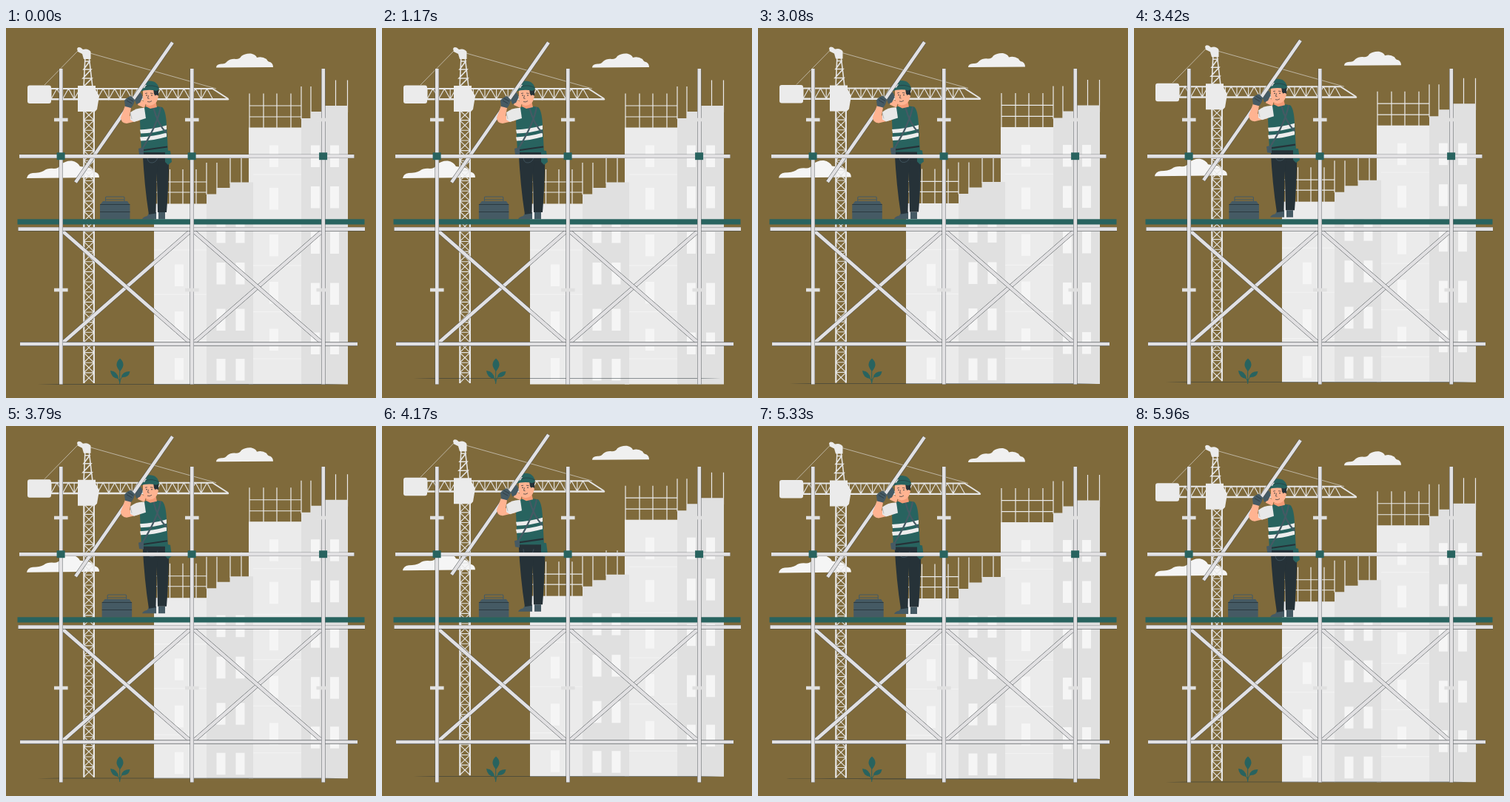
These frames come from a looping animation (500 by 500 pixels, 6000 ms). An HTML page:

```html
<!DOCTYPE html>
<html lang="en">
<head>
<meta charset="utf-8">
<title>Scaffolding</title>
<style>
  html, body { margin: 0; width: 100%; height: 100%; overflow: hidden; background: #7f6a3b; }
  svg { display: block; width: 100vw; height: 100vh; }
</style>
</head>
<body>
<svg id="stage" viewBox="0 0 500 500"></svg>
<script>
const TEAL = '#28635f', DARK = '#263238', SLATE = '#455a64', SKIN = '#ffb391';
const PALE = '#ebebeb', SIDE = '#e0e0e0', WHITE = '#f5f5f5', STEEL = '#e2e1e3';

const rect = (x, y, x2, y2, fill, r = 0) =>
  `<rect x="${x}" y="${y}" width="${x2 - x}" height="${y2 - y}" rx="${r}" fill="${fill}"/>`;
const shape = (d, fill) => `<path d="${d}" fill="${fill}"/>`;
const line = (d, stroke, w = 1, extra = '') =>
  `<path d="${d}" fill="none" stroke="${stroke}" stroke-width="${w}" ${extra}/>`;
const each = (list, f) => list.map(f).join('');
const range = (n, f) => Array.from({ length: n }, (_, i) => f(i)).join('');

// Steel tube: a light bar with thin dark edges
const tube = (x, y, x2, y2, w = 5) => {
  const d = `M${x} ${y}L${x2} ${y2}`;
  return line(d, '#3a4144', w + .4) + line(d, STEEL, w - .3);
};

function clouds() {
  return shape('M284 53.5Q284 49 291 48.5Q296 49 299 45Q304 41 311 42Q316 42 318 38Q323 34 331 34.5Q338 36 339 40Q346 38 352 42Q354 46 357 46Q361 48 361 53Z', '#f0f0f0')
    + shape('M28 203Q29 197 36 196Q46 196 51 193Q56 189 65 190Q71 190 74 185Q80 179 89 179.5Q97 181 100 187Q106 188 110 188Q116 189 118 194Q126 195 126 202Z', WHITE);
}

function crane() {
  const c = '#e6e6e6';
  const mast = range(27, i => {
    const y = 111 + i * 13.65, b = y + 13.65;
    return `M105 ${y}H119M105 ${y}L119 ${b}M119 ${y}L105 ${b}`;
  });
  const jib = range(14, i => {
    const x = 61 + i * 15.6;
    return `M${x} 82V96L${x + 7.8} 82L${x + 15.6} 96`;
  });
  return line('M99 29L52 77M110 33L284 82', c, .6)
    + line(mast, c, 1.1) + line('M105.3 100V480M118.9 100V480', c, 2.2)
    + line('M105 80L107 38M117 80L112 38M106 45H113L105 56H115L104 68H116L105 79', c, 1.6)
    + shape('M96 28Q97 25 101 26.5L104 29Q111 27 114.5 32V42H105L103 35L97 32Z', PALE)
    + line(jib, c, 1.1) + line('M60 82H279L300 95.5', c, 1.9)
    + line('M60 96.3H300', c, 2.4, 'stroke-linecap="round"')
    + rect(29, 77.5, 61, 102, PALE, 3)
    + shape('M97 78H121V83L126 92L123 110L120 113H97Z', PALE);
}

function buildings() {
  const bars = (xs, top, bottom) => each(xs, x => `M${x} ${top}V${bottom}`);
  const windows = (xs, ys) => each(ys, y => each(xs, x => rect(x, y, x + 12, y + 29.5, WHITE)));
  const floors = (x, x2, ys) => line(each(ys, y => `M${x} ${y}H${x2}`), WHITE, .8);
  const rebar = bars([205, 221.5, 239, 257], 191, 238) + bars([271, 285], 182, 225)
    + bars([303, 318], 176, 210) + bars([329, 348, 366, 385], 88.5, 135)
    + bars([399, 412], 79, 123) + bars([428, 445.5, 461.5], 70.5, 114)
    + 'M202 208H271M202 222H271M329 105H399M329 120H399';
  return line(rebar, PALE, 1.2)
    + rect(328, 134.5, 399.5, 481.5, PALE)
    + shape('M399 481.5V122H412V113H428V105H462V481.5Z', SIDE)
    + rect(200, 237.5, 271.5, 481.5, PALE)
    + shape('M271 481.5V224.5H284.5V216H302.5V208.5H334V481.5Z', SIDE)
    + floors(200, 271, [300, 360, 422.5]) + floors(334, 399, [198, 260, 321, 383.5, 447])
    + windows([228], [319.5, 383, 446])
    + windows([284.5, 310.5], [261, 317, 379.5, 447])
    + windows([356], [158.5, 216, 279, 343, 406.5])
    + windows([412, 438], [158.5, 214, 275.5, 344.5, 411.5]);
}

function worker() {
  const stripe = y => shape(`M181 ${y + 6}Q200 ${y + 5} 217 ${y}V${y + 5.5}Q200 ${y + 10.5} 182 ${y + 11}Z`, '#ededed');
  return shape('M193 250L203 249V258.5H184Q185 255 191 254ZM206 249H215V258.5H206Z', SLATE)
    // trousers
    + shape('M203 166H220Q221 195 217 249H205L203.5 185Z', DARK)
    + shape('M184.5 166H209Q204 185 203.5 205L202.5 250.5L193 252Q187 214 184.5 166Z', DARK)
    // vest
    + shape('M187 107L198 105L211 107Q216 111 217 131L219 168H183L181 126Z', TEAL)
    + stripe(131.5) + stripe(141.5)
    + line('M209 107Q205 129 185 162M199 107Q205 130 217 142', SLATE, 2.2)
    + line('M183 165.5L218 160.5', DARK, 2.2)
    + shape('M179 163L186 161V172L180 171Z', SLATE)
    + shape('M215 165L222 166L224 181L219 185L215 181Z', TEAL)
    + line('M191 174Q191 183 198 182Q204 181 205 174', SLATE, .8)
    // head
    + shape('M190 98H202L204 107L195 109L189 106Z', '#f39a75')
    + shape('M185 82H204L205 96Q203 104 194 105Q186 104 185 96Z', SKIN)
    + shape('M199 82H206V91L203 94L200 89Z', DARK)
    + `<circle cx="203.5" cy="93" r="2.4" fill="${SKIN}"/>`
    + line('M188 88.5L191 88M195 88L198.5 88.5M192.5 91L191.5 95L193.5 95.5M191 99.5Q194 101 197 98.5', DARK, .7)
    + `<circle cx="190" cy="91" r=".8" fill="${DARK}"/><circle cx="197" cy="91" r=".8" fill="${DARK}"/>`
    + shape('M184 83Q183 73 193 71.5Q205 71 207 83L203 85Q193 82 180 86Q179 83 184 81Z', TEAL)
    + shape('M181 80Q185 76 190 77L187 81L181 82Z', WHITE)
    + line('M188 79Q198 76 207 81', DARK, .6)
    // far hand, pole, near arm
    + shape('M181 95L189 102L187 108L178 104Z', SKIN)
    + shape('M174 97L179 86Q184 87 184.5 94L181 101L176 103Z', SLATE)
    + tube(225, 19.5, 94, 208.5, 4.8)
    + shape('M161 105L169 108L167 119L176 115L180 125L163 129Q155 128 155 121Z', SKIN)
    + shape('M168 114Q177 107 187 108L189 122L173 127L168 124Z', '#e8e8e8')
    + line('M168 114L170 123', '#9b9b9b', .6)
    + shape('M160 98Q164 93 169 92L174 97Q173 104 169 108L161 106Z', SLATE)
    + line('M163 98L170 102M165 95L172 99', DARK, .7);
}

function toolbox() {
  return line('M134.5 236V229.5Q134.5 228 136 228H158.5Q160 228 160 229.5V236M134.5 232H160', SLATE, 1.1)
    + shape('M131 234H164L167.5 239V258.5H127V239Z', SLATE)
    + line('M127 238.5H167.5M127 248.5H167.5', DARK, .8);
}

function scaffold() {
  const posts = [74.3, 251.3, 428.8];
  const braces = each([[77, 248.5], [254, 426.5]], ([a, b]) =>
    tube(b, 275, a, 425) + tube(a, 275, b, 425));
  return braces
    + each([[18, 173.4, 470.5], [16.5, 271.7, 485], [19, 427, 475]], ([x, y, x2]) => tube(x, y, x2, y))
    + rect(15.5, 258.3, 484.5, 265.5, TEAL)
    + each(posts, x => tube(x, 55, x, 481.5))
    + each(posts, (x, i) => each([124, 354], y =>
        rect(x - 9.3, y - 2.3, x + (i < 2 ? 9.3 : 4), y + 2.3, SIDE)))
    + each(posts, x => rect(x - 5.7, 168.3, x + 5.3, 178.2, TEAL));
}

function plant() {
  return line('M153.7 481V458M153.7 479Q154 473 161 468M153.7 479Q153 473 146 469', TEAL, 1)
    + shape('M154 464Q145 454 154 446.5Q163 454 154 464ZM152 474Q142 473 141 463Q151 464 152 474ZM156 472Q157 464 167.5 464Q166 473 156 472Z', TEAL);
}

const group = (id, content) => `<g id="${id}">${content}</g>`;
document.getElementById('stage').innerHTML =
  rect(0, 0, 500, 500, '#7f6a3b')
  + group('scene', clouds() + crane() + buildings())
  + group('ground', `<ellipse cx="250" cy="481.3" rx="212" ry=".32" fill="${DARK}"/>`)
  + plant()
  + group('person', worker())
  + group('box', toolbox())
  + scaffold();

const move = (id, x, y) =>
  document.getElementById(id).setAttribute('transform', `translate(${x} ${y})`);

function draw(now) {
  const t = now % 6000;
  const swing = 1 - Math.abs(t % 3000 / 1500 - 1);
  const lift = t < 3000 ? 0 : -10 * swing;
  move('scene', 0, lift);
  move('person', 0, lift);
  move('ground', 0, -10 * swing);
  move('box', 5 * swing, 0);
}

const start = performance.now();
function tick() {
  draw(performance.now() - start);
  requestAnimationFrame(tick);
}
tick();
</script>
</body>
</html>
```
